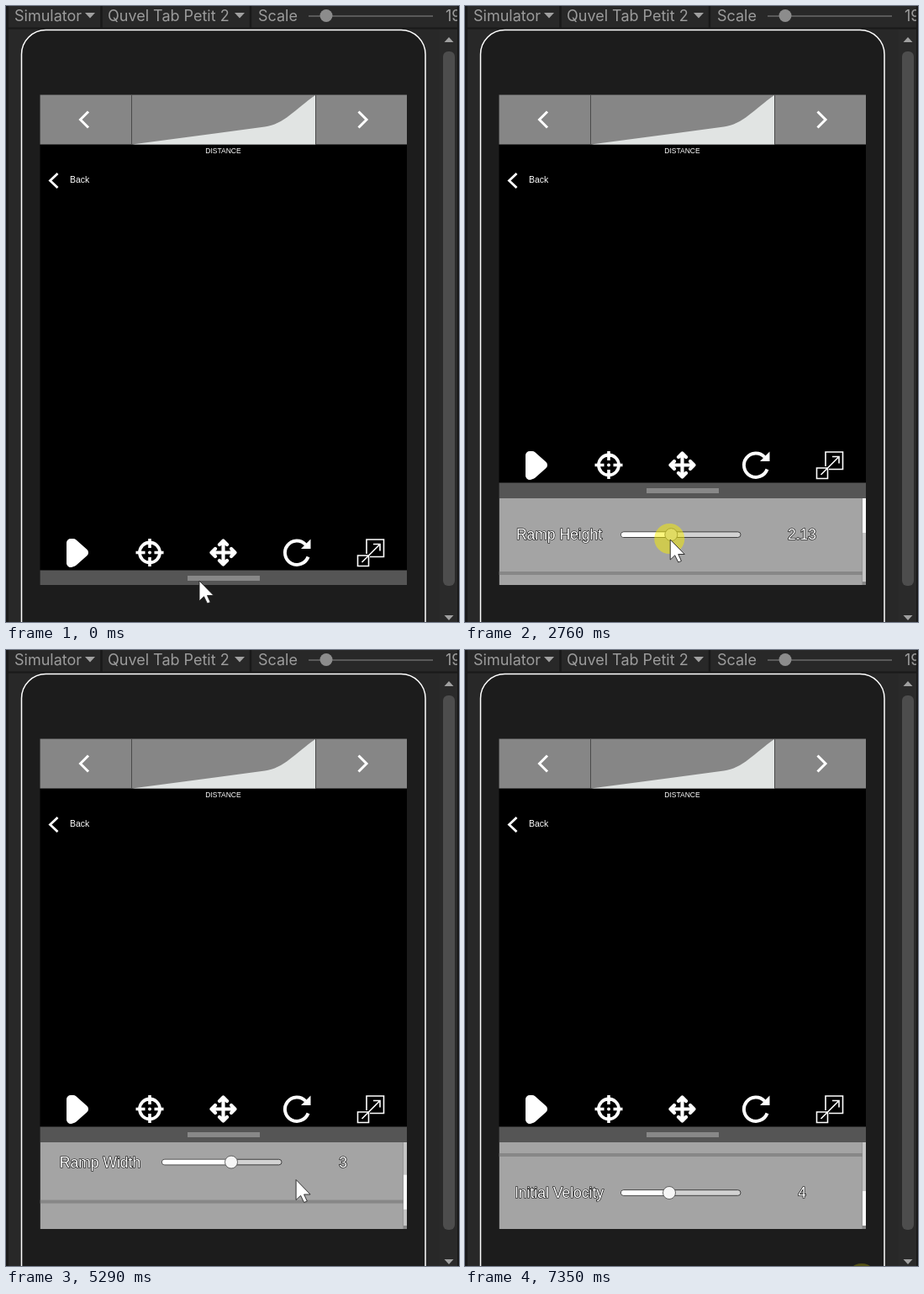
Recreate the animation shown at these times as an HTML page. Size 539x732 px, loop 7.42 s.

```html
<!DOCTYPE html>
<html lang="en">
<head>
<meta charset="utf-8">
<title>Sliding settings panel</title>
<style>
  html, body { margin: 0; width: 100%; height: 100%; overflow: hidden; background: #282828; }
  svg { display: block; }
  text { font-family: "Liberation Sans", Arial, sans-serif; fill: #fff; }
  .editor text { font: 18px Inter, sans-serif; fill: #9c9c9c; }
  .line { fill: none; stroke: #fff; }
  .row text { font-size: 17.5px; text-anchor: middle; stroke: #000; stroke-width: 1.2px; paint-order: stroke; }
</style>
</head>
<body>
<svg width="539" height="732" viewBox="0 0 539 732">
  <defs>
    <clipPath id="screen"><rect x="40.5" y="105.5" width="436.5" height="582.5"/></clipPath>
    <clipPath id="viewport"><rect x="40.5" y="585" width="436.5" height="103"/></clipPath>
  </defs>

  <g class="editor">
    <rect width="539" height="732" fill="#282828"/>
    <rect width="3" height="732" fill="#1a1a1a"/>
    <rect y="25.5" width="539" height="2" fill="#191919"/>
    <path d="M113.5 0V26M291 0V26" stroke="#191919" stroke-width="2.5"/>
    <text x="10" y="18">Simulator</text>
    <text x="121" y="18">Quvel Tab Petit 2</text>
    <text x="300" y="18">Scale</text>
    <text x="523" y="18">19</text>
    <path d="M94 8h12l-6 6.5zM272 8h12l-6 6.5z" fill="#a0a0a0"/>
    <path d="M360 12H508" stroke="#595959" stroke-width="2"/>
    <circle cx="381" cy="11.5" r="7.5" fill="#8c8c8c"/>
    <rect x="516" y="28" width="21" height="704" fill="#2a2a2a"/>
    <rect x="537" width="2" height="732" fill="#191919"/>
    <rect x="520" y="54" width="14" height="635" rx="6" fill="#4d4d4d"/>
    <path d="M521.5 43h11l-5.5-6zM521.5 724h11l-5.5 6z" fill="#a0a0a0"/>
  </g>

  <rect x="18.5" y="28.5" width="480.5" height="800" rx="29" fill="#1c1c1c" stroke="#fff" stroke-width="1.5"/>
  <g clip-path="url(#screen)">
    <rect x="40" y="105" width="437" height="583"/>
    <rect x="40" y="105" width="437" height="59.5" fill="#868686"/>
    <path d="M150 164.5L308 143.5C330 141 345 122 368 106V164.5Z" fill="#e1e4e3"/>
    <path d="M149.5 106V164.5M368.5 106V164.5" stroke="#4a4a4a"/>
    <path class="line" d="M98 125.5L88.5 135L98 144.5M419.5 125.5L429 135L419.5 144.5" stroke-width="3"/>
    <path class="line" d="M61.5 199L52.5 207.5L61.5 216" stroke-width="2.8"/>
    <text x="258.5" y="174.6" font-size="8.5" text-anchor="middle">DISTANCE</text>
    <text x="76" y="210" font-size="10.4">Back</text>

    <g id="panel">
      <path d="M77 534H80L93 545.5L80 557L77 558Z" fill="#fff" stroke="#fff" stroke-width="10" stroke-linejoin="round"/>
      <g transform="translate(171 545.5)">
        <circle class="line" r="12" stroke-width="3.8"/>
        <path class="line" d="M0-16.5V-5.5M0 16.5V5.5M-16.5 0H-5.5M16.5 0H5.5" stroke-width="3.6"/>
        <circle r="2" fill="#fff"/>
      </g>
      <g id="arrows" class="line" transform="translate(258.5 545.5)" stroke-width="4.2" stroke-linecap="round" stroke-linejoin="round"></g>
      <g transform="translate(346 545.5)">
        <path class="line" d="M10.5-9.5A14.2 14.2 0 1 0 13.5 5" stroke-width="4"/>
        <path d="M16.5-16V-4.5H5Z" fill="#fff"/>
      </g>
      <path class="line" d="M429 547V530H449.500V550.500H433M418.500 549H431.500V561.500H418.500ZM423.500 557L444.500 536M437 535.500H445V543.500" stroke-width="1.600"/>
      <rect x="40" y="566.5" width="437" height="18.5" fill="#555"/>
      <rect x="216" y="573" width="86" height="6" fill="#888"/>
      <g clip-path="url(#viewport)">
        <rect x="40" y="585" width="437" height="103" fill="#a4a4a4"/>
        <g id="content"></g>
        <rect x="472.5" y="585" width="4.5" height="103" fill="#858585"/>
        <rect x="473" y="585" width="4" height="99" fill="#c4c4c4"/>
        <rect id="thumb" x="473" width="4" height="41" fill="#fafafa"/>
      </g>
    </g>
  </g>

  <g id="pointer">
    <circle id="halo" cx="-1" cy="-1" r="18" fill="#faf000"/>
    <path d="M0 0V24L5.5 18.800L9.500 27L13.200 25.500L9.500 17.500H17Z" fill="#fff" stroke="#222" stroke-width=".9"/>
  </g>
</svg>

<script>
const LOOP = 7420;
const MAX_SCROLL = 167;
const $ = id => document.getElementById(id);
const clamp = (v, lo, hi) => Math.min(hi, Math.max(lo, v));
const progress = (t, from, to) => clamp((t - from) / (to - from), 0, 1);
const easeOut = u => u * (1.5 - 0.5 * u);
const smooth = u => u * u * (3 - 2 * u);

const press = (from, to) => ({ from, to });
const togglePanel = press(70, 280);
const dragKnob = press(2140, 3850);
const flickList = press(4460, 4810);
const dragList = press(5760, 6200);
const lastClick = press(7350, LOOP);
const presses = [togglePanel, dragKnob, flickList, dragList, lastClick];

const move = (from, to, x, y) => ({ from, to, x, y });
const moves = [
  move(800, 1330, 283, 625),
  move(1590, 1940, 268, 634),
  move(2500, 2970, 233, 634),
  move(3230, dragKnob.to, 287.7, 625),
  move(dragKnob.to, 4200, 351, 643),
  move(flickList.from, flickList.to, 374, 546),
  move(flickList.to, 5500, 338, 650),
  move(dragList.from, dragList.to, 345, 595),
  move(6530, 7020, 473, 748)
];

function cursorAt(t) {
  let x = 230, y = 683;
  for (const m of moves) {
    const u = easeOut(progress(t, m.from, m.to));
    x += (m.x - x) * u;
    y += (m.y - y) * u;
  }
  return { x, y };
}

const draggedUp = (t, { from, to }) => cursorAt(from).y - cursorAt(clamp(t, from, to)).y;

function scrollAt(t) {
  const coast = 18 * easeOut(progress(t, flickList.to, 5500));
  return Math.min(MAX_SCROLL, draggedUp(t, flickList) + coast + draggedUp(t, dragList));
}

function haloAt(t) {
  const held = presses.find(p => t >= p.from && t < p.to);
  return held ? 0.25 + 0.25 * progress(t, held.from, held.from + 140) : 0;
}

const row = (label, value, y, knob) => `
  <g class="row" transform="translate(0 ${y})">
    <text x="112" y="6.2">${label}</text>
    <rect x="185.5" y="-3.3" width="142.5" height="6.6" rx="3.3" fill="#d2d2d2" stroke="#333" stroke-width=".9"/>
    <rect class="fill" x="186" y="-2.8" width="${knob - 186}" height="5.6" rx="2.8" fill="#fff"/>
    <circle class="knob" cx="${knob}" r="7.5" fill="#f6f6f6" stroke="#555" stroke-width=".9"/>
    <text class="value" x="401" y="6.2">${value}</text>
  </g>`;
const separator = y => `<rect x="40" y="${y - 2}" width="433" height="4" fill="#878787"/>`;

$('content').innerHTML =
  row('Ramp Height', 3, 628.2, 268) + separator(674) +
  row('Ramp Width', 3, 720, 268) + separator(767) +
  row('Initial Velocity', 4, 812, 243);

$('arrows').innerHTML = [0, 90, 180, 270]
  .map(angle => `<path transform="rotate(${angle})" d="M0 0V-14M-4.5-9.5L0-14L4.5-9.5"/>`).join('');

const part = name => document.querySelector('.row .' + name);
const fill = part('fill'), knob = part('knob'), value = part('value');

function setHeight(t) {
  const moved = t >= 2500;
  const x = moved ? cursorAt(Math.min(t, dragKnob.to)).x + 1.1 : 268;
  const held = t >= dragKnob.from && t < dragKnob.to;
  knob.setAttribute('cx', x);
  knob.setAttribute('fill', held ? '#c8c8c8' : '#f6f6f6');
  fill.setAttribute('width', x - 186);
  value.textContent = moved ? +((x - 190) / 26).toFixed(2) : 3;
}

const place = (id, x, y) => $(id).setAttribute('transform', `translate(${x} ${y})`);

function draw(t) {
  const { x, y } = cursorAt(t);
  const scroll = scrollAt(t);
  place('pointer', x, y);
  place('panel', 0, 104 * (1 - smooth(progress(t, 210, 770))));
  place('content', 0, -scroll);
  $('thumb').setAttribute('y', 585 + 58 * scroll / MAX_SCROLL);
  $('halo').setAttribute('opacity', haloAt(t));
  setHeight(t);
}

const start = performance.now();
function frame() {
  draw((performance.now() - start) % LOOP);
  requestAnimationFrame(frame);
}
frame();
</script>
</body>
</html>
```
